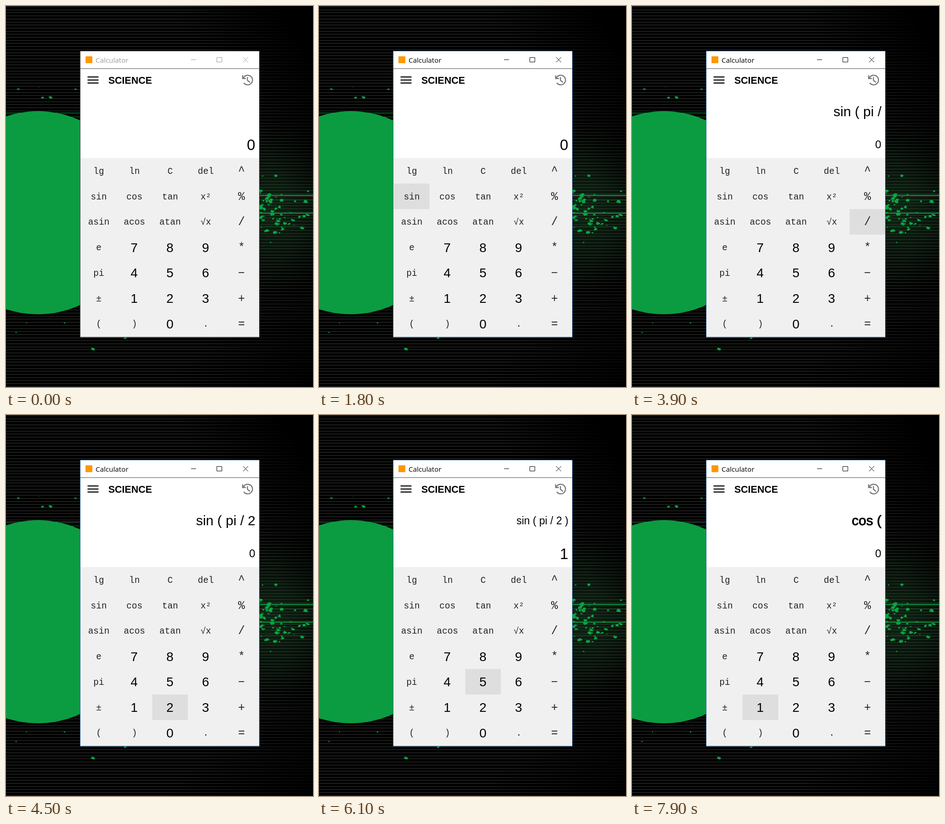
An HTML page for the animation above (8 s loop, 672x833 px).

```html
<!DOCTYPE html>
<html lang="en">
<head>
<meta charset="utf-8">
<title>Calculator</title>
<style>
  html, body { margin: 0; width: 100%; height: 100%; overflow: hidden; background: #000; }
  svg { display: block; width: 672px; height: 833px; }
  text { font-family: "Liberation Sans", Arial, sans-serif; white-space: pre; }
  .mono { font-family: "Liberation Mono", "Courier New", monospace; fill: #222; }
  .title { font-family: "Open Sans", sans-serif; }
</style>
</head>
<body>
<svg id="stage" viewBox="0 0 672 833">
  <defs>
    <radialGradient id="glow" gradientUnits="userSpaceOnUse" cx="575" cy="445" r="190">
      <stop offset="0" stop-color="#0c2512"/><stop offset="1" stop-color="#000"/>
    </radialGradient>
    <linearGradient id="shade" gradientUnits="userSpaceOnUse" x1="470" y1="170" x2="640" y2="60">
      <stop offset="0" stop-color="#000" stop-opacity="0"/><stop offset="1" stop-color="#000"/>
    </linearGradient>
    <linearGradient id="shade2" gradientUnits="userSpaceOnUse" x1="520" y1="640" x2="690" y2="790">
      <stop offset="0" stop-color="#000" stop-opacity="0"/><stop offset="1" stop-color="#000" stop-opacity=".85"/>
    </linearGradient>
  </defs>
  <rect width="672" height="833" fill="url(#glow)"/>
  <g id="lines"></g>
  <rect width="672" height="400" fill="url(#shade)"/>
  <rect y="400" width="672" height="433" fill="url(#shade2)"/>
  <circle cx="70" cy="452" r="222" fill="#0b9c42"/>
  <g id="shards" fill="#0ba443"></g>

  <rect x="163" y="99" width="391" height="625" fill="#fff"/>
  <rect x="163" y="332.5" width="391" height="391" fill="#f0f0f0"/>
  <rect x="163" y="136" width="391" height="1.6" fill="#8a8a8a"/>
  <rect x="174" y="110" width="15" height="15" rx="1" fill="#ff9800"/>
  <g id="chrome">
    <text class="title" x="196" y="123.5" font-size="15.3" fill="currentColor">Calculator</text>
    <path d="M405 117.5h11M461.5 112.5h11v10h-11zM519 112l11 11M530 112l-11 11" fill="none" stroke="currentColor"/>
  </g>
  <path d="M178.500 155.200h24M178.500 161.800h24M178.500 168.400h24" stroke="#222" stroke-width="2.800"/>
  <text x="224" y="170" font-size="21.500" font-weight="700" textLength="" id="mode">SCIENCE</text>
  <g fill="none" stroke="#777" stroke-width="2.400">
    <path d="M519.500 157.500A10.500 10.500 0 1 1 520.500 168M528.500 155.500v7l5.500 4.500"/>
    <path d="M518 151.500v7h7"/>
  </g>
  <rect id="hover" width="78" height="55.700" fill="#dedede"/>
  <g id="keys" text-anchor="middle"></g>
  <text id="expr" text-anchor="end" x="546"/>
  <text id="result" text-anchor="end" x="545.500"/>
  <rect id="border" x="162.500" y="98.500" width="392" height="625.500" fill="none"/>
</svg>
<script>
const $ = id => document.getElementById(id);
const COL = 78.1, ROW = 55.75, LEFT = 164, TOP = 332.5;

function add(parent, tag, attrs, text = '') {
  const el = document.createElementNS('http://www.w3.org/2000/svg', tag);
  for (const k in attrs) el.setAttribute(k, attrs[k]);
  el.textContent = text;
  parent.append(el);
}

let seed = 7;
const rand = () => (seed = seed * 16807 % 2147483647) / 2147483647;

function shard(x, y, r) {
  let d = '';
  for (let i = 0; i < 5; i++) {
    const a = i * 1.257 + rand(), q = r * (0.6 + rand() * 0.5);
    d += `${(x + q * 1.2 * Math.cos(a)).toFixed(1)},${(y + q * 0.85 * Math.sin(a)).toFixed(1)} `;
  }
  add($('shards'), 'polygon', { points: d });
}

// wallpaper
const line = (y, x, w, fill, h = 1) => add($('lines'), 'rect', { x, y, width: w, height: h, fill });
for (let y = 1; y < 833; y += 6.7) line(Math.round(y), 0, 672, '#343834');
for (const y of [233, 242, 257, 270, 284]) line(y, 0, 163, '#0a7a34');
line(413, 554, 118, '#0c9a42', 2);
line(424, 554, 118, '#0a4d22');
line(452, 554, 118, '#0c9a42', 2);
line(481, 554, 100, '#0a4d22');
[[27, 182, 3], [80, 200, 3.5], [97, 200, 4], [152, 182, 3], [73, 178, 1], [45, 693, 1.5],
 [128, 693, 2], [22, 714, 2], [190, 749, 5], [261, 726, 3], [590, 371, 5], [562, 372, 2],
 [656, 427, 5], [579, 517, 2]].forEach(s => shard(...s));
for (let i = 0; i < 55; i++) {
  const u = rand();
  shard(557 + 105 * u * u, 452 + (rand() + rand() - 1) * 55, 1.5 + rand() * 4);
}

// keypad
const labels = 'lg ln C del ^ sin cos tan x² % asin acos atan √x / e 7 8 9 * pi 4 5 6 − ± 1 2 3 + ( ) 0 . ='.split(' ');
labels.forEach((s, i) => {
  const c = i % 5, x = LEFT + (c + 0.5) * COL, y = TOP + (Math.floor(i / 5) + 0.5) * ROW;
  if (/\d/.test(s)) add($('keys'), 'text', { x: x - 0.5, y: y + 10, 'font-size': 28 }, s);
  else {
    const op = c === 4;
    add($('keys'), 'text', { class: 'mono', x, y: y + (op ? 7.5 : 6.5), 'font-size': op ? 25 : 19.5 }, s);
  }
});
$('mode').removeAttribute('textLength');

// [time, key under the pointer]
const hovers = [[0, ''], [800, 'del'], [900, 'tan'], [1000, 'cos'], [1100, 'sin'], [2100, 'asin'],
  [2200, 'e'], [2300, 'pi'], [2400, '±'], [2500, '('], [2800, '±'], [2900, 'pi'], [3200, '4'],
  [3300, '5'], [3400, '8'], [3500, '9'], [3600, '/'], [4100, '9'], [4200, '6'], [4300, '2'],
  [4700, '0'], [4800, ')'], [5200, '0'], [5300, '.'], [5400, '='], [5900, '.'], [6000, '3'],
  [6100, '5'], [6200, '8'], [6300, 'atan'], [6400, 'acos'], [6500, 'cos'], [6800, 'tan'],
  [6900, 'atan'], [7000, '8'], [7100, '5'], [7200, '1'], [7300, ')'], [7400, '('], [7900, '1']];
// [time, expression, result, finished]
const entries = [[0, '', '0', true], [2000, 'sin', '0'], [2600, 'sin (', '0'], [3100, 'sin ( pi', '0'],
  [3800, 'sin ( pi /', '0'], [4500, 'sin ( pi / 2', '0'], [5000, 'sin ( pi / 2 )', '0'],
  [5600, 'sin ( pi / 2 )', '1', true], [6700, 'cos', '0'], [7800, 'cos (', '0']];
const at = (list, t) => list.findLast(e => e[0] <= t);

function show(el, text, size, y) {
  el.textContent = text;
  el.setAttribute('font-size', size);
  el.setAttribute('y', y);
}

function draw(t) {
  const active = t >= 100;
  $('chrome').style.color = active ? '#000' : '#999';
  $('border').setAttribute('stroke', active ? '#3b73ad' : '#555');

  const key = labels.indexOf(at(hovers, t)[1]);
  $('hover').style.display = key < 0 ? 'none' : '';
  if (key >= 0) {
    $('hover').setAttribute('x', LEFT + key % 5 * COL);
    $('hover').setAttribute('y', TOP + Math.floor(key / 5) * ROW);
  }

  const [, expr, result, done] = at(entries, t);
  show($('expr'), expr, done ? 23 : 30, done ? 239 : 241);
  $('expr').setAttribute('stroke', expr.startsWith('cos') ? '#000' : 'none');
  show($('result'), result, done ? 33 : 24, done ? 315 : 311);
}

function tick(now) {
  draw(now % 8000);
  requestAnimationFrame(tick);
}
draw(0);
requestAnimationFrame(tick);
</script>
</body>
</html>
```
